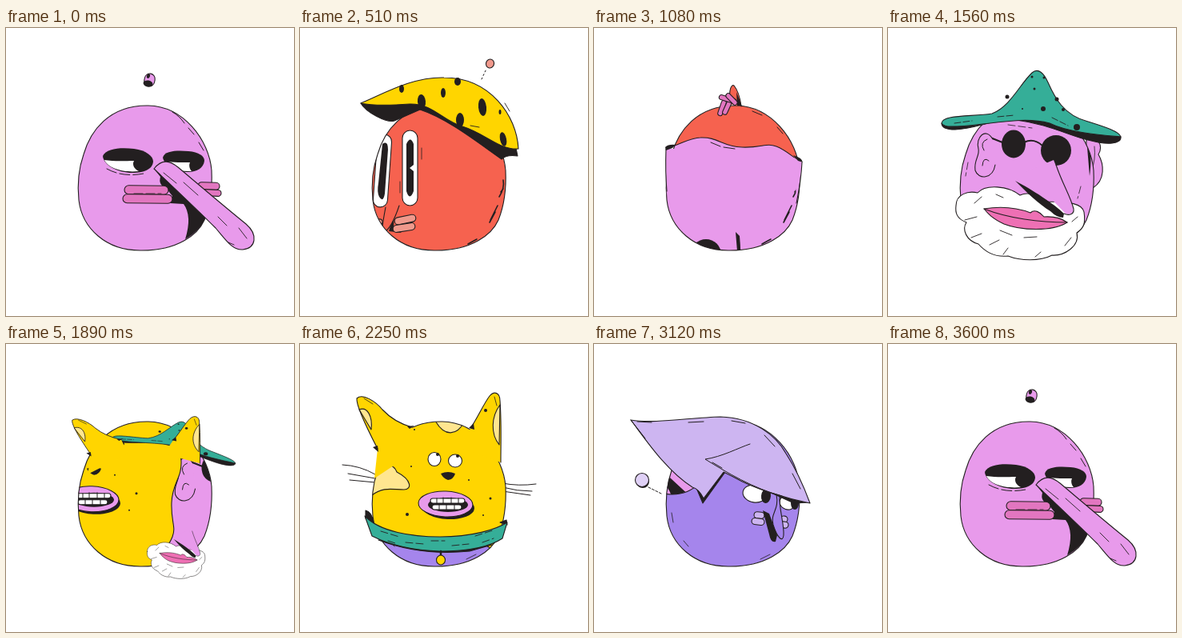
Animation, 360 px wide and 360 px high, one loop 3630 ms. Source, as an HTML page with a canvas:

```html
<!DOCTYPE html>
<html lang="en">
<head>
<meta charset="utf-8">
<title>Turning heads</title>
<style>
html, body { margin: 0; width: 100%; height: 100%; overflow: hidden; background: #fff; }
canvas { display: block; width: 360px; height: 360px; }
</style>
</head>
<body>
<canvas id="stage"></canvas>
<script>
const LOOP = 3630, TICK = 30, STEP = 62.05, POSES = 58;
const INK = '#231f20', PINK = '#e89aeb', ROSE = '#e276c0', RED = '#f6624f', BLUSH = '#f0998c',
  TEAL = '#35ae98', GOLD = '#ffd500', CREAM = '#ffe690', VIOLET = '#a585ec', LILAC = '#cdb5f1', WHITE = '#fff';

const canvas = document.getElementById('stage'), ctx = canvas.getContext('2d');
const dpr = window.devicePixelRatio || 1;
canvas.width = canvas.height = 360 * dpr;

const head = new Path2D('M178 97C128 96 105 130 97 158C90 178 89 195 91 215C95 250 125 279 170 278C215 278 240 258 248 240C256 220 258 200 257 178C254 140 222 98 178 97Z');
const wave = 'M-60 0H90C105-2 118-13 133-13C155-14 160-2 185-1S215-7 228-2S250 13 260 18H420';

// Drawing helpers
function fill(d, color) {
  ctx.fillStyle = color;
  ctx.fill(d instanceof Path2D ? d : new Path2D(d));
}
function line(d, width = 1.1, dash = []) {
  ctx.lineWidth = width;
  ctx.setLineDash(dash);
  ctx.stroke(d instanceof Path2D ? d : new Path2D(d));
  ctx.setLineDash([]);
}
function shape(d, color, width) { fill(d, color); line(d, width); }
function oval(x, y, rx, ry, color, tilt = 0, edge = color !== INK) {
  const p = new Path2D();
  p.ellipse(x, y, rx, ry, tilt, 0, 7);
  fill(p, color);
  if (edge) line(p);
}
function pill(x, y, w, h, color, tilt = 0) {
  ctx.save();
  ctx.translate(x + w / 2, y + h / 2);
  ctx.rotate(tilt);
  const p = new Path2D();
  p.roundRect(-w / 2, -h / 2, w, h, Math.min(w, h) / 2);
  fill(p, color);
  line(p);
  ctx.restore();
}
function dots(list) { for (const [x, y, rx, ry = rx, t = 0] of list) oval(x, y, rx, ry, INK, t); }

// Keys: [pose, x, y, turn, scaleX, scaleY]
const REST = [0, 0, 0, 0, 1, 1];
function at(n, keys) {
  let i = 1;
  while (i < keys.length - 1 && n > keys[i][0]) i++;
  const a = keys[i - 1], b = keys[i];
  const k = Math.min(1, Math.max(0, (n - a[0]) / (b[0] - a[0])));
  return REST.map((r, j) => (a[j] ?? r) + ((b[j] ?? r) - (a[j] ?? r)) * k);
}
function place(n, keys, cx, cy, draw) {
  const [, x, y, turn, sx, sy] = at(n, keys);
  if (sx < .02 || sy < .02) return;
  ctx.save();
  ctx.translate(cx + x, cy + y);
  ctx.rotate(turn);
  ctx.scale(sx, sy);
  ctx.translate(-cx, -cy);
  draw();
  ctx.restore();
}
function seam(n, keys, turn = 0) {
  const m = new DOMMatrix().translate(175, 188).rotate(turn).translate(-175, -188).translate(0, at(n, keys)[1]);
  const area = new Path2D(), edge = new Path2D();
  area.addPath(new Path2D(wave + 'V500H-60Z'), m);
  edge.addPath(new Path2D(wave), m);
  return { area, edge };
}

const longNose = {
  skin: PINK,
  seam(n) {
    const area = new Path2D();
    area.arc(98, 140, at(n, [[47, 0], [50, 48], [54, 230]])[1], 0, 7);
    return { area, edge: area };
  },
  face(n) {
    place(n, [[51, -130, -40], [55, -45, -8], [58, 0, 0], [61, 55, 0], [65, 160, 0]], 175, 188, () => {
      fill('M121 160C125 150 145 149 160 151C175 153 184 160 184 167C183 177 172 181 158 181C140 181 122 172 121 160Z', INK);
      fill('M123 165C135 167 150 166 160 166C157 171 161 177 166 179C148 181 128 176 123 165Z', WHITE);
      fill('M196 162C198 153 215 153 228 154C241 155 248 160 248 166C247 175 238 180 228 180C213 180 198 172 196 162Z', INK);
      fill('M199 167C210 168 220 168 230 168C228 172 230 177 232 179C215 180 203 174 199 167Z', WHITE);
      line('M126 176Q146 187 172 182M208 180Q216 184 226 184', 1, [13, 4]);
      fill('M185 176L193 186Q190 196 200 200L208 210L205 219L222 220Q233 235 224 264Q245 252 252 232L215 198Z', INK);
      pill(148, 197, 55, 11, ROSE, .01);
      pill(146, 208, 62, 11, ROSE, .01);
      line('M160 207H194', .8, [11, 4]);
    });
    line('M208 105Q217 110 223 119M228 125L235 133M241 143L247 153', 1);
  },
  out(n) {
    place(n, [[51, -120, -50, -.3, 0, 0], [55, -40, -10, 0, .7, .9], [58, 0, 0], [60, 38, -5, -.08], [63, 20, -20, -.2, 0, 0]], 215, 190, () => {
      pill(240, 193, 27, 9, ROSE, .03);
      pill(244, 202, 25, 8, ROSE, .05);
      shape('M185 176C195 163 205 166 215 174C240 195 268 219 300 245C315 258 313 275 296 277C283 278 275 265 262 250C240 228 205 195 185 176', PINK);
      line('M197 181L213 194M222 193L240 209M265 236L276 247M291 250L301 263M278 268L285 271', .9);
    });
    if (n > 55 && n < 62) place(n, [[55, -18, 20], [58, 0, 0], [62, 25, -15]], 179, 65, () => {
      pill(173, 57, 13, 16, PINK, .2);
      oval(177.5, 69.5, 6, 4, INK, .2);
      oval(178, 60, 2, 3, INK, .3);
    });
  }
};

const spottedCap = {
  skin: RED,
  seam: n => seam(n, [[2, 310], [7, 55]], 90),
  face(n) {
    place(n, [[3, -130, 0], [5, -50, 0], [8, 0, 0], [11, 45, 0], [14, 55, -90], [17, 60, -190]], 175, 188, () => {
      pill(94, 133, 18, 91, WHITE, .07);
      fill('M103 145Q110 140 110 152L106 207Q104 219 99 211Q96 205 98 194Z', INK);
      pill(128, 128, 19, 94, WHITE);
      fill('M133 145Q138 134 142 145V171L137 175L142 179V204Q137 217 133 204Z', INK);
      fill('M118 232L111 254L127 256L117 249Z', INK);
      shape('M107 224C104 240 102 250 104 256C113 252 119 237 124 222', RED);
      pill(93, 239, 10, 7, BLUSH, -.1);
      pill(94, 247, 9, 7, BLUSH, -.1);
      pill(118, 235, 27, 9, BLUSH, -.2);
      pill(116, 245, 28, 9, BLUSH, -.15);
      line('M152 150V164M125 192V206', .8);
    });
  },
  out(n) {
    place(n, [[4, -10, 15, 0, .7, 0], [6, -3, 0], [8, 0, 0], [10, 8, -4, .03], [14, 5, 5, 0, .75, 0]], 175, 118, () => {
      shape('M76 94C82 105 108 119 118 116L150 102C184 113 222 143 252 164Q258 158 272 160L268 140L180 80Z', INK);
      shape('M76 94C105 82 140 61 180 62C238 62 271 110 273 151C250 153 232 132 203 123C178 116 166 94 137 95Q95 98 76 94Z', GOLD);
      dots([[127, 76, 3, 5], [179, 81, 3, 6], [197, 67, 4, 5], [228, 99, 5, 11, -.1], [152, 92, 5, 9, -.1], [200, 115, 5, 9], [254, 139, 4, 9, -.2], [250, 105, 1.5, 3]]);
      line('M213 122L224 124M256 94L262 104', .9);
    });
    if (n > 5 && n < 11) place(n, [[5, -20, 14], [8, 0, 0], [11, 22, -2]], 237, 45, () => {
      line('M227 64L233 51', 1, [2, 3]);
      oval(237.5, 44.5, 5, 5.5, BLUSH, .3);
    });
    if (n > 7 && n < 20) line('M254 190Q256 200 249 211M251 205L254 201M247 222L238 240M244 230L237 243M221 264L210 270', 1.6);
    if (n > 14 && n < 20) place(n, [[14, 0, 15], [16, 0, 0], [17, 0, 0], [19, 4, 20, 0, 1, .2]], 172, 98, () => {
      shape('M170 95C168 76 172 70 175 72C180 78 183 90 184 98', RED);
      fill('M178 80L185 98L179 97Z', INK);
      for (const [x, y, w, t] of [[150, 97, 20, 1.9], [156, 95, 22, 2], [156, 86, 22, .3], [163, 86, 18, .8]]) pill(x, y, w, 6, ROSE, t);
      line('M198 104L210 109M229 124L236 132', 1);
    });
  }
};

const greenHat = {
  skin: PINK,
  keys: [[12, 300], [17, 150], [20, 60]],
  seam(n) { return seam(n, this.keys); },
  back(n) {
    if (n > 21) place(n, [[21, -30, 0], [25, 0, 0], [29, -18, 0]], 255, 170, () => {
      shape('M248 140C262 132 270 148 263 158C270 170 272 190 256 200L246 196Z', PINK);
      line('M258 148Q260 164 254 180', .8);
    });
  },
  face(n) {
    place(n, [[18, -70, 130], [21, -50, 20], [25, 0, 0], [28, 45, 10], [32, 160, 10]], 175, 188, () => {
      fill('M247 125L252 130Q255 165 252 185Z', INK);
      line('M128 137L143 143M170 143Q182 137 193 147', 2);
      oval(157, 145, 15, 17.5, INK);
      oval(210, 153, 19, 19, INK);
      shape('M131 139C122 123 109 137 113 151C115 160 107 165 109 178C113 190 131 189 134 171', PINK);
      line('M124 139Q114 143 120 153M118 172Q119 160 126 166', 1);
      line('M150 121L180 125M100 168L97 185M241 198L237 213M190 174L198 190', .8, [9, 4]);
    });
    if (n < 19) {
      const y = at(n, this.keys)[1];
      line(`M146 ${y - 7}L158 ${y - 2}M162 ${y - 1}L176 ${y + 1}`, 1);
    }
  },
  out(n) {
    if (n > 14 && n < 19) {
      ctx.save();
      ctx.translate(0, at(n, this.keys)[1] - 150);
      fill('M90 151L101 151L94 185L91 210Q90 195 90 151ZM250 162L260 168Q258 190 253 215Z', PINK);
      line('M90 151Q89 180 91 204M260 168Q259 190 253 219');
      fill('M89 149Q93 145 102 146L98 150L90 153ZM249 159Q260 162 261 168L255 166Z', INK);
      ctx.restore();
    }
    place(n, [[18, -60, 40, 0, .7, 0], [21, -35, 22], [25, 0, 0], [28, 25, 12, 0, .9, 1], [32, 70, 40, 0, 0, 0]], 165, 245, () => {
      shape('M85 222C85 208 100 203 112 206C122 195 150 197 165 209C178 203 190 212 200 217C220 218 242 217 245 230C247 244 245 250 236 256C240 273 220 285 205 284C190 292 165 291 150 285C132 287 120 278 113 270C98 266 92 252 98 243C85 238 84 230 85 222Z', WHITE);
      line('M96 240L111 236M104 262L117 257M127 271L139 265M144 283L150 275M184 286L191 280M221 272L229 262M108 219L117 211M135 208L144 212M230 242L237 236M140 253L155 259M170 262L186 261', .9);
      shape('M120 226C145 222 165 226 178 231C183 226 190 230 195 236C210 235 220 240 224 243C205 255 165 253 145 245C130 238 125 232 120 226Z', '#ee70b4');
      line('M120 226C150 238 190 243 224 243');
      fill('M171 180L207 165L232 226Q231 235 222 232Z', PINK);
      line('M210 171C218 195 228 210 232 226C233 233 226 235 220 232');
      fill('M159 191C180 202 208 220 220 232L219 237Q211 237 203 229C187 219 175 207 159 191Z', INK);
    });
    place(n, [[19, 0, 30, 0, .4, 0], [22, -4, -26, -.01], [25, 0, 0], [28, 3, -6], [32, 60, 30, .3, .4, 0]], 180, 115, () => {
      shape('M67 119Q67 127 84 127C115 125 132 113 160 115C200 120 225 134 250 140C275 147 292 145 291 136L180 105Z', INK);
      shape('M67 119C68 108 105 111 130 107C153 98 165 70 180 56C188 49 195 57 200 68C208 86 219 109 250 117C269 123 289 129 291 136C268 134 226 131 202 119C165 109 120 123 83 123Q70 124 67 119Z', TEAL);
      dots([[183, 76, 1.5], [194, 101, 3], [211, 89, 2.5], [149, 86, 2.5], [236, 124, 4], [168, 101, 1], [195, 62, 1.5], [219, 102, 2], [180, 61, 1.5]]);
      line('M137 111L158 109M205 112L225 122M83 119L105 116', .9, [8, 3]);
    });
  }
};

const cat = {
  skin: GOLD,
  seam: n => seam(n, [[27, 310], [32, 55]], 90),
  back(n) {
    place(n, [[30, 0, 0, 0, .65, .4], [34, 0, 0], [37, 0, 0], [40, 0, -80, 0, .7, .3]], 175, 170, () =>
      line('M53 151Q75 152 94 163M60 162L94 168M62 170L94 173M253 174Q273 178 295 175M253 179Q271 184 290 184M253 184L288 189', 1));
  },
  face(n) {
    place(n, [[27, -150, -10], [31, -50, -5], [36, 0, 0], [41, 0, -190]], 175, 188, () => {
      shape('M80 144C105 148 118 150 121 160C140 170 140 182 130 182C115 182 104 178 90 189Z', CREAM);
      shape('M168 94H207C197 116 180 117 168 94Z', CREAM);
      oval(168, 144, 8, 8.5, WHITE);
      oval(194, 146, 8.5, 8, WHITE);
      dots([[172, 138, 2], [197, 140, 2], [110, 136, 1.3], [143, 107, 1], [221, 131, 2], [139, 153, 1], [211, 170, 1], [134, 213, 2], [229, 214, 1], [238, 193, 1.5]]);
      fill('M176 162Q185 158 194 162Q192 169 185 170Q179 168 176 162Z', INK);
      oval(185, 204, 33, 15, INK, .05);
      oval(182, 200, 34, 16, PINK, .04);
      oval(185, 201, 25, 9, INK);
      pill(163, 193, 43, 6, WHITE);
      pill(165, 201, 37, 6, WHITE);
      line('M171 193V199M179 192V199M189 192V199M198 193V199M174 201V207M183 201V207M193 201V207', 1);
    });
  },
  out(n) {
    place(n, [[27, 0, 20, 0, .7, 0], [31, 0, 5, 0, .95, .9], [36, 0, 0], [38, 0, -22], [41, 0, 20, 0, .8, 0]], 175, 125, () => {
      const ears = 'M97 131C83 104 70 77 71 68C78 61 95 72 103 82Q118 98 140 104M214 104C222 92 230 74 237 65C243 58 250 61 250 71C252 98 251 122 251 148';
      fill('M93 168L97 131C83 104 70 77 71 68C78 61 95 72 103 82Q118 98 140 104L150 130ZM200 130L214 104C222 92 230 74 237 65C243 58 250 61 250 71C252 98 251 122 251 148Z', GOLD);
      shape('M74 82C84 78 91 90 89 107Z', CREAM);
      shape('M250 76C239 91 238 112 249 126Z', CREAM);
      line(ears);
      fill('M91 129L97 127L98 135ZM134 103L143 102L137 106ZM211 105L217 99L218 107Z', INK);
      oval(232, 83, 2, 2, INK);
      line('M80 68L91 75M243 66L246 77', .8);
    });
    place(n, [[30, 0, 50, 0, .4, 0], [33, 0, 14, 0, .95, .9], [36, 0, 0], [39, 0, -90], [41, 0, -140, 0, .6, 0]], 175, 240, () => {
      shape('M82 208Q90 210 92 223L82 218ZM250 223L258 220L259 226ZM98 245Q175 268 240 251L212 259Q150 265 98 245Z', INK);
      shape('M81 215C100 235 140 241 175 241C215 241 245 232 259 223L253 243C235 255 205 259 175 259C140 258 110 250 90 240Z', TEAL);
      line('M101 234L124 241M132 248L155 250M164 246H181M190 252L211 250M219 240L241 233M110 246L119 249M228 248L242 243', .9, [9, 4]);
      line('M176 259V266', 2.5);
      oval(176, 270, 5.5, 6, GOLD);
    });
  }
};

const fringe = {
  skin: VIOLET,
  seam: n => seam(n, [[33, 300], [36, 252], [39, 160], [41, 95], [42, 55]]),
  face(n) {
    place(n, [[38, -90, 140], [43, -65, 0], [50, 0, 0], [54, 70, 60]], 175, 188, () => {
      oval(201, 187, 15, 11, WHITE, .15);
      oval(215, 190, 6, 9, INK, .1);
      oval(242, 198, 10, 9, WHITE, .3);
      oval(251, 199, 5, 8, INK);
      dots([[213, 183, 1]]);
      for (const [x, y, w] of [[200, 210, 13], [197, 218, 16], [233, 215, 9], [232, 222, 11]]) pill(x, y, w, 8, LILAC, .12);
      fill('M211 208L219 238Q221 249 227 247L229 239L219 212Z', INK);
      shape('M228 188C232 208 220 211 224 226C229 242 236 249 237 239C238 226 231 205 232 190', VIOLET);
    });
    line('M97 211L99 223M112 246L118 253M208 269L220 263', .8);
  },
  out(n) {
    place(n, [[38, -10, 20, -.1, .4, 0], [42, -26, 0, -.04], [46, -12, 0, -.02], [50, 0, 0], [52, 28, 35, .12, .9, .8], [54, 45, 70, .3, .7, 0]], 170, 140, () => {
      shape('M128 180L136 199L164 160L250 199L268 198L180 130Z', INK);
      shape('M46 95C75 100 120 92 158 91C200 92 228 115 240 137C255 160 263 180 270 199C240 193 200 181 174 166L162 160L137 193Q131 181 123 179C91 159 65 120 46 95Z', LILAC);
      line('M195 125C180 130 160 141 139 144C165 160 200 181 235 190M46 95L64 118M54 97L72 98M118 98L137 97M172 96L189 99M213 114L226 128M248 162L258 181M148 148L160 155', 1);
    });
    if (n > 46 && n < 53) place(n, [[46, 55, -8], [50, 0, 0], [53, -16, 3]], 60, 170, () => {
      line('M68 179L84 187', 1, [3, 2]);
      oval(61, 172, 8, 8, INK);
      oval(60, 170, 8.5, 8.5, '#dfd0f6');
    });
  }
};

// [character, first pose, last pose, pose shift]
const cast = [
  [longNose, 0, 6, 58], [spottedCap, 2, 19, 0], [greenHat, 12, 32, 0],
  [cat, 27, 41, 0], [fringe, 33, 54, 0], [longNose, 47, 58, 0]
];

function render(pose) {
  ctx.setTransform(dpr, 0, 0, dpr, 0, 0);
  fill('M0 0H360V360H0Z', WHITE);
  ctx.strokeStyle = INK;
  ctx.lineCap = ctx.lineJoin = 'round';
  const seen = cast.filter(([, from, to]) => pose >= from && pose <= to);
  for (const [who, , , shift] of seen) who.back?.(pose + shift);
  ctx.save();
  ctx.clip(head);
  for (const [who, , , shift] of seen) {
    const n = pose + shift, { area, edge } = who.seam(n);
    ctx.save();
    ctx.clip(area);
    fill(head, who.skin);
    who.face(n);
    ctx.restore();
    line(edge);
  }
  ctx.restore();
  line(head);
  for (const [who, , , shift] of seen) who.out(pose + shift);
}

let last = -1;
function tick() {
  const tickNow = Math.floor(performance.now() % LOOP / TICK) * TICK;
  const pose = Math.min(POSES, Math.floor(tickNow / STEP));
  if (pose !== last) render(last = pose);
  requestAnimationFrame(tick);
}
tick();
</script>
</body>
</html>
```
